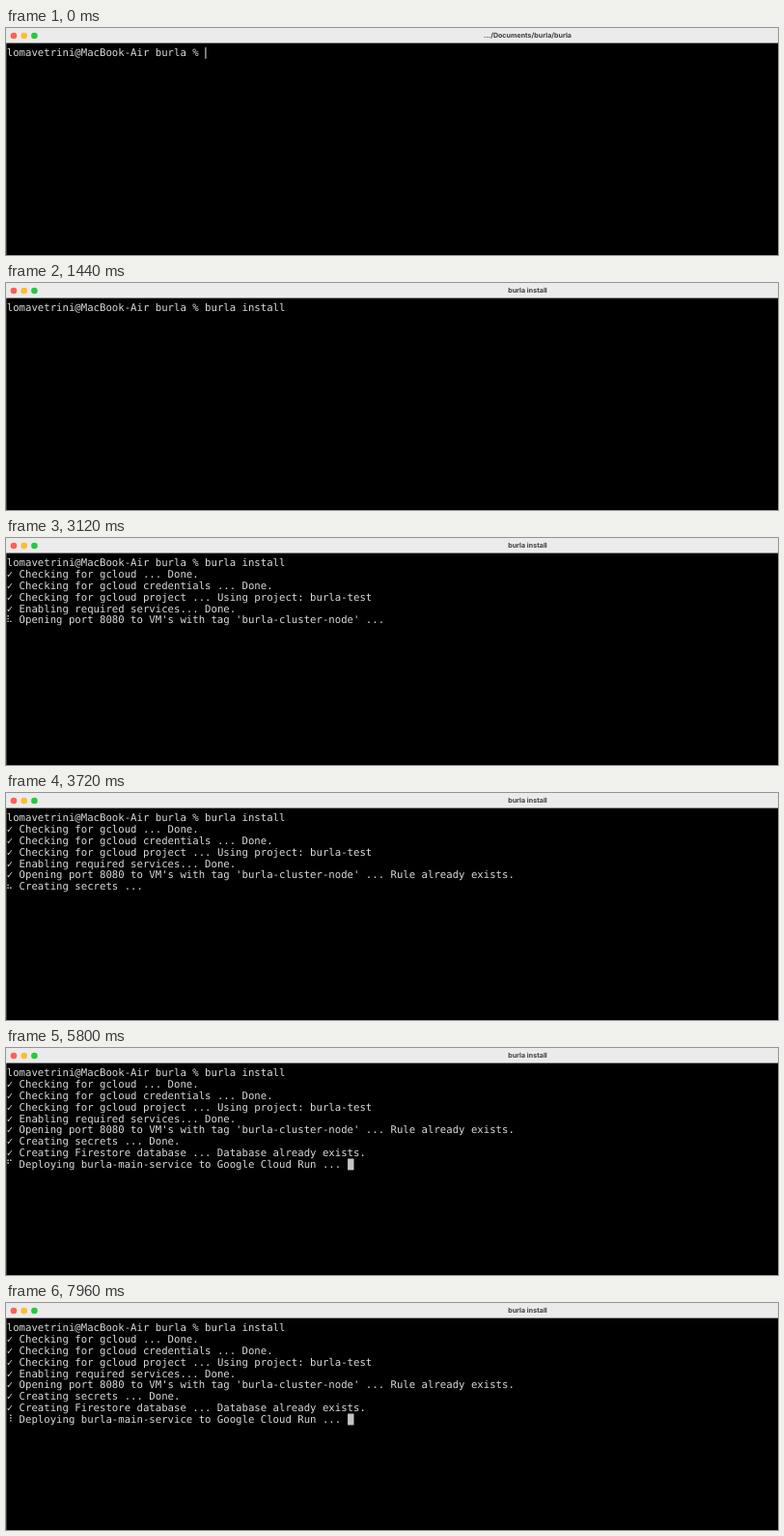
These frames come from a looping animation (800x235 px, 8000 ms). An HTML page:

```html
<!DOCTYPE html>
<html lang="en">
<head>
<meta charset="utf-8">
<title>Terminal install</title>
<style>
  html, body { margin: 0; width: 100%; height: 100%; overflow: hidden; background: #000; }
  svg { display: block; width: 800px; height: 235px; }
  text { white-space: pre; text-rendering: geometricPrecision; }
  /* The minute rotation keeps baselines from snapping to whole pixels. */
  #screen { transform: rotate(0.004deg); }
  #screen text { font: 10.67px "DejaVu Sans Mono", monospace; fill: #dadada; }
  #title { font: bold 7.1px Inter, sans-serif; fill: #3c3c3c; text-anchor: middle; }
</style>
</head>
<body>
<svg viewBox="0 0 800 235">
  <rect width="800" height="235"/>
  <rect y="15" width="0.7" height="220" fill="#5a5a5a"/>
  <rect width="800" height="15.6" fill="#ebebeb"/>
  <circle cx="8" cy="8" r="3.3" fill="#fe5f57"/>
  <circle cx="18.7" cy="8" r="3.3" fill="#febc2e"/>
  <circle cx="29.4" cy="8" r="3.3" fill="#28c840"/>
  <text id="title" x="540.5" y="10.3"></text>
  <g id="screen"></g>
  <path id="spinner" fill="#dadada"/>
  <rect id="cursor" fill="#c4c4c4"/>
</svg>
<script>
const LOOP = 8000;
const CELL = 6.424, LEFT = 0.75, TOP = 20, LINE = 11.82, BASELINE = 9.35;
const PROMPT = 'lomavetrini@MacBook-Air burla % ';
const COMMAND = 'burla install';
const TYPE_START = 120, TYPE_STEP = 85, ENTER = 1370;
const SPINNER = '⠋⠙⠹⠸⠼⠴⠦⠧⠇⠏', SPIN_STEP = 200 / 3;

// Each task runs until the next one starts.
const tasks = [
  [1480, 'Checking for gcloud ...', ' Done.'],
  [1620, 'Checking for gcloud credentials ...', ' Done.'],
  [1765, 'Checking for gcloud project ...', ' Using project: burla-test'],
  [1828, 'Enabling required services ...', ' Done.', 'Enabling required services...'],
  [2632, "Opening port 8080 to VM's with tag 'burla-cluster-node' ...", ' Rule already exists.'],
  [3280, 'Creating secrets ...', ' Done.'],
  [3860, 'Creating Firestore database ...', ' Database already exists.'],
  [5068, 'Deploying burla-main-service to Google Cloud Run ...']
].map(([start, label, result, doneLabel = label]) => ({ start, label, result, doneLabel }));

const byId = id => document.getElementById(id);
const title = byId('title'), screen = byId('screen');
const spinner = byId('spinner'), cursor = byId('cursor');

const lines = Array.from({ length: tasks.length + 1 }, (_, row) => {
  const line = document.createElementNS('http://www.w3.org/2000/svg', 'text');
  line.setAttribute('x', LEFT);
  line.setAttribute('y', TOP + row * LINE + BASELINE);
  return screen.appendChild(line);
});

function setText(node, text) {
  if (node.textContent !== text) node.textContent = text;
}

function setCursor(column, row, width) {
  const box = { x: LEFT + column * CELL, y: TOP + row * LINE, width, height: LINE };
  for (const name in box) cursor.setAttribute(name, box[name]);
}

// The low six bits of a braille code point are its dots, column by column.
function braillePath(glyph, row) {
  const bits = glyph.charCodeAt(0) & 63;
  let path = '';
  for (let dot = 0; dot < 6; dot++) {
    if (!(bits >> dot & 1)) continue;
    const x = dot < 3 ? 1.4 : 4.2;
    const y = TOP + row * LINE + 1 + dot % 3 * 2.8;
    path += `M${x} ${y}h1.4v1.4h-1.4z`;
  }
  return path;
}

function draw(time) {
  const typed = Math.max(0, Math.min(COMMAND.length, Math.floor((time - TYPE_START) / TYPE_STEP) + 1));
  setText(title, time < ENTER ? '.../Documents/burla/burla' : COMMAND);
  setText(lines[0], PROMPT + COMMAND.slice(0, typed));

  let dots = '';
  tasks.forEach((task, i) => {
    const row = i + 1, next = tasks[row];
    let text = '';
    if (next && time >= next.start) {
      text = '✓ ' + task.doneLabel + task.result;
    } else if (time >= task.start) {
      text = '  ' + task.label;
      const step = Math.floor((time - task.start) / SPIN_STEP) % SPINNER.length;
      dots = braillePath(SPINNER[step], row);
    }
    setText(lines[row], text);
  });
  spinner.setAttribute('d', dots);

  const last = tasks[tasks.length - 1];
  if (time < ENTER) setCursor(PROMPT.length + typed, 0, 1.2);
  else if (time >= last.start) setCursor(last.label.length + 3, tasks.length, CELL);
  else setCursor(0, 0, 0);
}

const began = performance.now();
function tick() {
  draw((performance.now() - began) % LOOP);
  requestAnimationFrame(tick);
}
tick();
</script>
</body>
</html>
```
